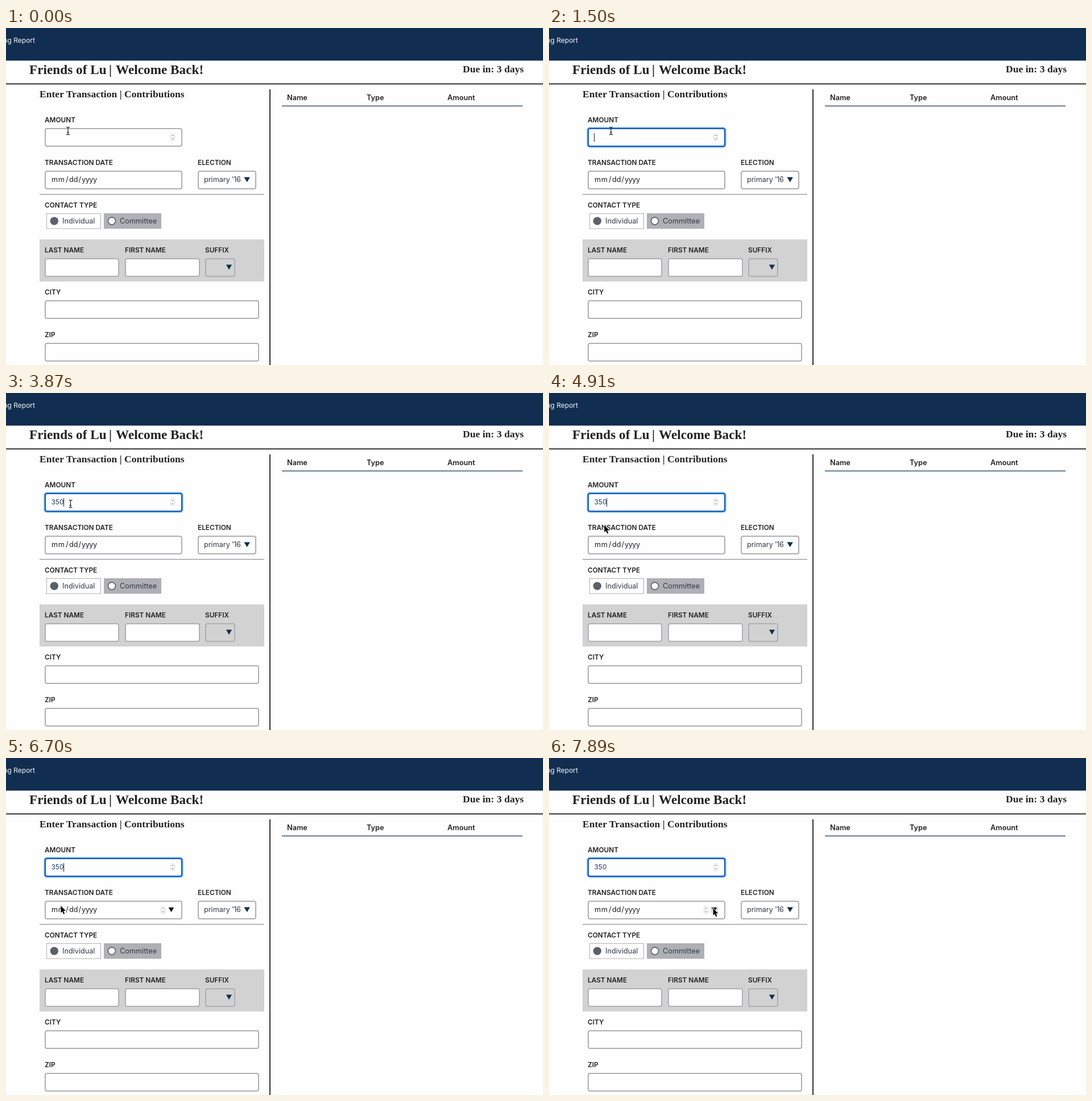
An HTML page for the animation above (8000 ms loop, 944 by 593 pixels).

```html
<!DOCTYPE html>
<html lang="en">
<head>
<meta charset="utf-8">
<title>Enter Transaction</title>
<style>
  html, body { margin: 0; width: 100%; height: 100%; overflow: hidden; background: #fefefe; }
  svg { display: block; width: 100vw; height: 100vh; }
  text { font-family: Inter, Roboto, sans-serif; font-size: 12.7px; fill: #212121; white-space: pre; }
  .serif { font-family: "Liberation Serif", "Noto Serif", serif; font-weight: 700; font-size: 17.45px; letter-spacing: 0.07px; }
  .title { font-size: 23.1px; }
  .label { font-weight: 600; font-size: 11.8px; }
  .head { font-weight: 600; }
  .chip { fill: #323a45; }
  .field { fill: #fefefe; stroke: #aeb0b5; stroke-width: 2; }
  .navy { fill: #112e51; }
  .thin { fill: none; stroke: #7d7d7d; stroke-width: 1; }
</style>
</head>
<body>
<svg viewBox="0 0 944 593" preserveAspectRatio="none">
  <defs>
    <filter id="soft" x="-5%" y="-30%" width="110%" height="160%"><feGaussianBlur stdDeviation="0.7"/></filter>
    <g id="spin">
      <rect x="-3.5" y="-6.5" width="7" height="13" rx="3" fill="#fefefe" stroke="#d0d0d0" stroke-width="0.8"/>
      <path d="M-1.8 -2 L0 -4 L1.8 -2 M-1.8 2 L0 4 L1.8 2" class="thin"/>
    </g>
  </defs>

  <rect width="944" height="593" fill="#fefefe"/>
  <rect width="944" height="57.4" class="navy"/>
  <text x="51" y="25.5" text-anchor="end" style="fill:#f4f6f8;font-size:12px">ng Report</text>

  <text class="serif title" x="41" y="80.5">Friends of Lu</text>
  <text class="serif title" x="181" y="80.5">|</text>
  <text class="serif title" x="193" y="80.5">Welcome Back!</text>
  <text class="serif" x="803" y="78">Due in: 3 days</text>
  <rect y="97.5" width="944" height="1.8" fill="#1b1b1b"/>
  <rect x="463.1" y="108" width="1.8" height="485" fill="#1b1b1b"/>
  <text class="serif" x="59" y="122.3">Enter Transaction | Contributions</text>

  <text class="head" x="494" y="127">Name</text>
  <text class="head" x="634" y="127">Type</text>
  <text class="head" x="776" y="127">Amount</text>
  <rect x="485" y="136.5" width="423" height="1.4" fill="#2f4a6b"/>

  <rect x="59" y="292" width="395" height="1.2" fill="#8d8f94"/>
  <rect x="59" y="372" width="395" height="74" fill="#d2d2d2"/>
  <g id="form"></g>

  <g id="focus">
    <rect x="67.8" y="175.8" width="242.4" height="33.4" rx="4" fill="none" stroke="#7dbaf3" stroke-width="3" filter="url(#soft)"/>
    <rect x="69" y="177" width="240" height="31" rx="3" fill="#fefefe" stroke="#0f56b8" stroke-width="2"/>
  </g>
  <use href="#spin" x="293" y="192"/>
  <text id="amount" x="79.5" y="196.3" style="fill:#1f3a66;font-size:11.9px"></text>
  <rect id="caret" y="185" width="1.1" height="15" fill="#1f2f4a"/>

  <text y="271" style="font-size:12.7px"><tspan x="80" letter-spacing="0.6">mm</tspan><tspan x="105">/</tspan><tspan x="111">dd</tspan><tspan x="127.5">/</tspan><tspan x="133" letter-spacing="-0.5">yyyy</tspan></text>
  <g id="hover">
    <use href="#spin" x="276" y="267.5"/>
    <rect id="glow" x="284" y="262.5" width="14" height="10" fill="#e2e2e2"/>
    <path d="M285.7 262.9 h9.6 l-4.8 8.4 z" fill="#111"/>
  </g>
  <text y="271" style="font-size:12.6px;fill:#323a45"><tspan x="348">primary</tspan><tspan x="397" letter-spacing="-0.5">'16</tspan></text>
  <path class="navy" d="M418.5 262.5 h10.4 l-5.2 8.8 z"/>

  <rect x="71.5" y="326.5" width="95" height="26.5" fill="#fefefe" stroke="#aeb0b5"/>
  <circle cx="84.8" cy="339.6" r="7.2" fill="#5b616b"/>
  <text class="chip" x="99" y="344">Individual</text>
  <rect x="172" y="326" width="101" height="27.3" fill="#aeb0b5"/>
  <circle cx="186" cy="339.6" r="6.5" fill="#fefefe" stroke="#5b616b" stroke-width="1.7"/>
  <text class="chip" x="200" y="344">Committee</text>
  <path class="navy" d="M386.9 416.4 h10.2 l-5.1 8.8 z"/>

  <g id="beam" fill="none">
    <path d="M-3 -6.7 Q0 -6.7 0 -4.8 Q0 -6.7 3 -6.7 M0 -5 V5 M-3 6.7 Q0 6.7 0 4.8 Q0 6.7 3 6.7 M-1.8 2.6 H1.8" stroke="#222" stroke-width="1.2"/>
  </g>
  <path id="arrow" d="M0 0 V12.6 L2.8 10 L4.9 14.8 L7 13.9 L5 9.1 H8.9 Z" fill="#0a0a0a" stroke="#fff" stroke-width="1.4" paint-order="stroke"/>
</svg>
<script>
const LOOP = 8000;
const $ = id => document.getElementById(id);

// label, x, top of box, width, optional box fill
const fields = [
  ["AMOUNT", 68, 176, 242],
  ["TRANSACTION DATE", 68, 251, 242],
  ["ELECTION", 337, 251, 103],
  ["LAST NAME", 68, 405, 131],
  ["FIRST NAME", 209, 405, 132],
  ["SUFFIX", 350, 405, 53, "#d2d2d2"],
  ["CITY", 68, 479, 377],
  ["ZIP", 68, 554, 377]
];
const label = (name, x, y) => `<text class="label" x="${x}" y="${y}">${name}</text>`;
$("form").innerHTML = label("CONTACT TYPE", 68, 316.2) + fields.map(([name, x, y, w, fill = "#fefefe"]) =>
  label(name, x, y - 10.2) +
  `<rect class="field" x="${x + 1}" y="${y + 1}" width="${w - 2}" height="31" rx="3" style="fill:${fill}"/>`
).join("");

const blinks = [450, 1050, 1500, 1940, 2540, 2990, 3280, 4470, 4910, 5800, 6250, 6850, 7000, 7890];
const typed = [[0, "", 79], [3280, "3", 87.3], [3870, "350", 101]];
// start time, pointer kind, x, y
const pointer = [
  [0, "beam", 109, 181], [1640, "beam", 113.4, 195],
  [4910, "arrow", 97.3, 232.6], [5060, "arrow", 65.3, 239], [5210, "arrow", 89.6, 260],
  [5350, "arrow", 88.9, 260.7], [6700, "arrow", 96.2, 260], [6850, "arrow", 250.5, 285.5],
  [7000, "arrow", 310.2, 287.3], [7140, "arrow", 314.2, 272], [7290, "arrow", 293.7, 266],
  [7440, "arrow", 289.5, 264.8], [7740, "arrow", 289.2, 264.5], [7890, "arrow", 288.5, 264.4]
];

const latest = (list, t) => list.filter(step => step[0] <= t).pop();
const show = (id, on) => $(id).setAttribute("visibility", on ? "visible" : "hidden");

function draw(t) {
  const [, text, caretX] = latest(typed, t);
  $("amount").textContent = text;
  $("caret").setAttribute("x", caretX);
  show("caret", blinks.filter(b => b <= t).length % 2 === 1);
  show("focus", t >= 450);
  show("hover", (t >= 5060 && t < 7000) || t >= 7440);
  show("glow", t >= 7740);

  const [, kind, x, y] = latest(pointer, t);
  for (const id of ["beam", "arrow"]) show(id, id === kind);
  $(kind).setAttribute("transform", `translate(${x} ${y})`);
}

const start = performance.now();
function tick() {
  draw((performance.now() - start) % LOOP);
  requestAnimationFrame(tick);
}
tick();
</script>
</body>
</html>
```
